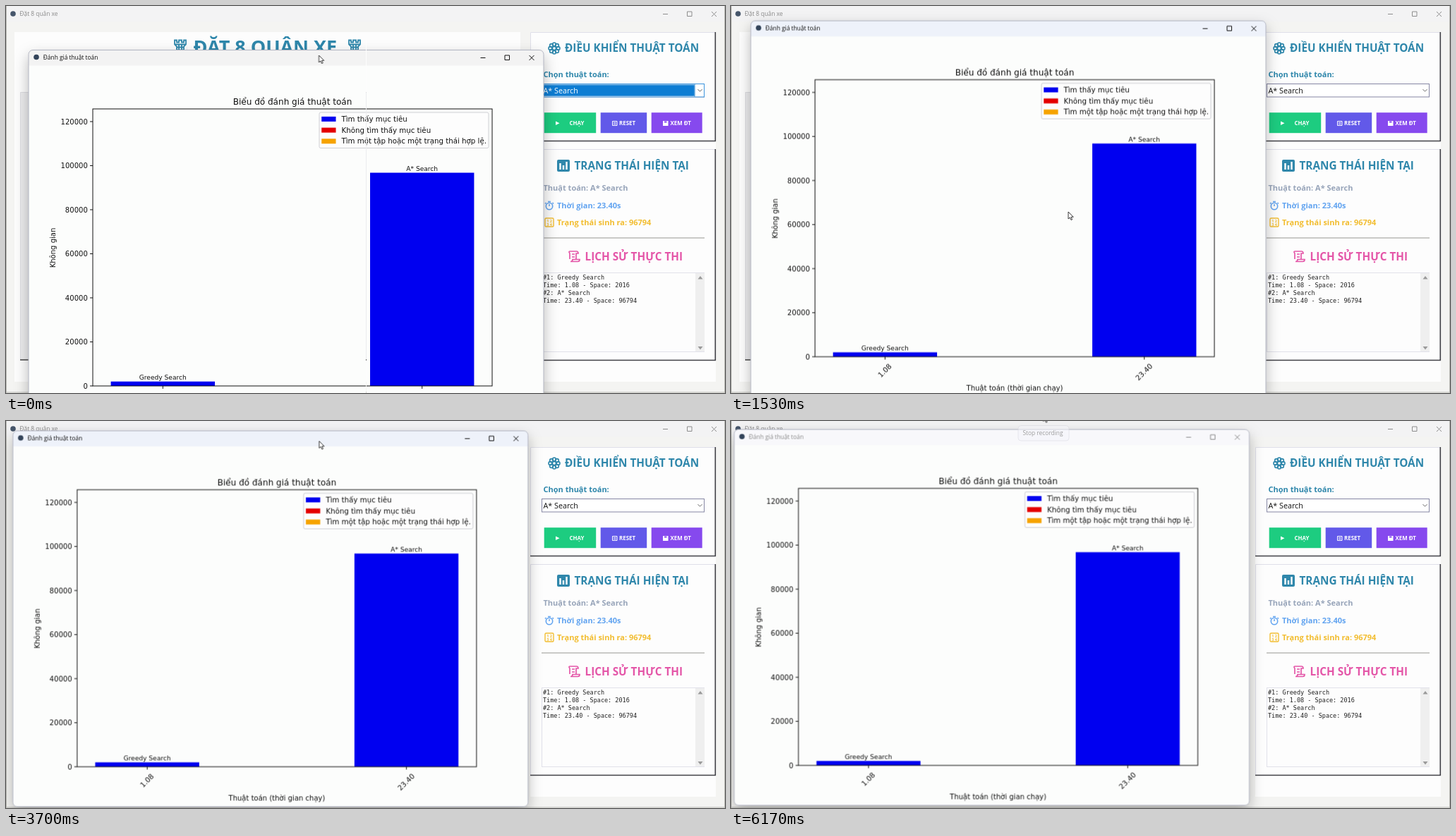
Animation of 1019x549 px, one loop 6210 ms. Source, as an HTML page:

```html
<!DOCTYPE html>
<html lang="vi">
<head>
<meta charset="utf-8">
<title>Đặt 8 quân xe</title>
<style>
  html, body { margin: 0; width: 100%; height: 100%; overflow: hidden; background: #f4f4f2; }
  svg { display: block; width: 1019px; height: 549px; }
  text { font-family: "Open Sans", "Noto Sans", sans-serif; white-space: pre; }
  .bold { font-weight: 700; }
  .head { font-weight: 700; font-size: 15.3px; }
  .info { font-weight: 700; font-size: 11px; }
  .btn { font-weight: 700; font-size: 7.9px; fill: #fff; }
  .bar { font-size: 8.4px; }
  .mono { font-family: "DejaVu Sans Mono", monospace; font-size: 8.5px; fill: #222; }
  #chart text { font-family: "DejaVu Sans", sans-serif; font-size: 10.04px; fill: #111; }
  #chart .title { font-size: 12.06px; }
  #chart .small { font-size: 9.1px; }
  #chart .key { font-size: 10.22px; }
  .mid { text-anchor: middle; }
  .end { text-anchor: end; }
  .line { fill: none; stroke: currentColor; }
</style>
</head>
<body>
<svg viewBox="0 0 1019 549" xmlns="http://www.w3.org/2000/svg">
  <defs>
    <filter id="shadow" x="-10%" y="-10%" width="120%" height="120%">
      <feDropShadow dx="0" dy="8" stdDeviation="10" flood-color="#000" flood-opacity=".28"/>
    </filter>
    <g id="controls" class="line">
      <path d="M0 0h7M34.5 -3.5h6.5v6.5h-6.5zM69 -3.5l7 7m0 -7l-7 7"/>
    </g>
    <path id="rook" class="line" stroke-width="1.8"
      d="M1 0h3v3h3v-3h4v3h3v-3h3v6l-3 3v7l3 4h-16l3 -4v-7l-3 -3zM2 6h14M4 10h10M7 7v9M11 7v9M4 14h10"/>
  </defs>

  <!-- main window -->
  <rect width="1019" height="549" fill="#f4f4f2"/>
  <rect width="1019" height="22" fill="#f3f3f4"/>
  <circle cx="10" cy="11" r="3.8" fill="#46566b"/>
  <text class="bar" x="19.5" y="14" fill="#8b8b8b">Đặt 8 quân xe</text>
  <use href="#controls" x="931" y="11.5" color="#8d8d8d"/>
  <path d="M0 548h1019M1018.5 0v549M.5 0v549" stroke="#b9b9b4"/>

  <rect x="12" y="37" width="717" height="496" fill="#fdfdfd"/>
  <g color="#2f87ab" fill="#2f87ab">
    <use href="#rook" x="238" y="48.5"/>
    <text class="bold" x="265.5" y="67.5" font-size="27">ĐẶT 8 QUÂN XE</text>
    <use href="#rook" x="485" y="48.5"/>
  </g>
  <rect x="20" y="122" width="700" height="380" fill="#ececee"/>
  <path d="M20.5 502V122.5H720" fill="none" stroke="#dcdce0"/>
  <path d="M20 502h700" stroke="#444" stroke-width="1.6"/>

  <rect x="743" y="37" width="263" height="496" fill="#fdfdfd"/>
  <g id="panels"></g>

  <g color="#2f87ab" fill="#2f87ab">
    <g id="flower" class="line" stroke-width="1.6"></g>
    <text class="head" x="792" y="65.3">ĐIỀU KHIỂN THUẬT TOÁN</text>
    <text class="info" x="761.5" y="101">Chọn thuật toán:</text>
    <rect x="781" y="218" width="18" height="17" rx="2"/>
    <path d="M785.5 232v-9M790 232v-6M794.5 232v-11" stroke="#fff" stroke-width="2.4"/>
    <text class="head" x="805.5" y="231.6">TRẠNG THÁI HIỆN TẠI</text>
  </g>

  <g id="combo">
    <rect x="759.5" y="110.5" width="230" height="18.5" fill="#fff" stroke="#8586a3"/>
    <path d="M980.5 118.2l3 3 3 -3" class="line" color="#666"/>
    <text x="761.5" y="124" font-size="10.75" fill="#111">A* Search</text>
  </g>
  <g id="picked">
    <rect x="759.5" y="110.5" width="230" height="18.5" fill="#fff" stroke="#3a93dc"/>
    <rect x="761" y="111.5" width="215" height="16.5" fill="#0d7dd3"/>
    <rect x="761.5" y="112" width="214" height="15.5" class="line" color="#b7cfe2" stroke-dasharray="1 1" stroke-width=".8"/>
    <path d="M976.5 111v18" stroke="#8cbfe6"/>
    <path d="M980.5 118.2l3 3 3 -3" class="line" color="#555"/>
    <text x="761.5" y="124" font-size="10.75" fill="#fff">A* Search</text>
  </g>

  <rect x="762.7" y="151.2" width="73.5" height="29" fill="#1dcc80"/>
  <path d="M779 163.5l5.5 2.7 -5.5 2.7z" fill="#fff"/>
  <text class="btn" x="798.5" y="169">CHẠY</text>
  <rect x="842.7" y="151.2" width="65.5" height="29" fill="#6259e9"/>
  <path d="M859.5 163.5h6.5v6h-6.5zM861 165.5h3.5M861 167.5h3.5" class="line" color="#fff"/>
  <text class="btn" x="869" y="169">RESET</text>
  <rect x="914.7" y="151.2" width="72" height="29" fill="#8649ee"/>
  <path d="M931 163h7.5v7h-7.5z" fill="#fff"/>
  <path d="M933 163.5h3.5v2h-3.5z" fill="#8649ee"/>
  <text class="btn" x="941.5" y="169">XEM ĐT</text>

  <text class="info" x="761.5" y="262.3" fill="#98a5ba">Thuật toán: A* Search</text>
  <g color="#62a4f0" fill="#62a4f0">
    <circle cx="770" cy="284" r="4.7" class="line" stroke-width="1.6"/>
    <path d="M770 284v-3M768 277.5h4M774.5 279l1.5 1.5M765.5 279l-1.5 1.5" class="line" stroke-width="1.5"/>
    <text class="info" x="781" y="286.6">Thời gian: 23.40s</text>
  </g>
  <g color="#f2bd30" fill="#f2bd30">
    <rect x="764" y="301" width="12" height="12" rx="1.5" class="line" stroke-width="1.4"/>
    <text class="bold" x="766.3" y="306.6" font-size="5.5">1 2</text>
    <text class="bold" x="766.3" y="311.8" font-size="5.5">3 4</text>
    <text class="info" x="781" y="310.8">Trạng thái sinh ra: 96794</text>
  </g>
  <path d="M759 329h231" stroke="#969690"/>
  <g color="#e456a8" fill="#e456a8">
    <path d="M799 359v-8q-2 -3 0 -3h9.5q2.500 0 2.500 3h-3v9M800 362.5h10.5q2.500 0 2.500 -3h-10q0 3 -2.500 3zM802 352h4M802 356h4" class="line" stroke-width="1.7"/>
    <text class="head" x="820.5" y="361">LỊCH SỬ THỰC THI</text>
  </g>

  <rect x="759.5" y="378.5" width="230" height="112" fill="#fdfdfd" stroke="#e1e1ea"/>
  <rect x="977" y="379" width="13" height="111" fill="#efefef"/>
  <path d="M980.5 387.5l3.5 -4.500 3.5 4.500zM980.5 483l3.5 4.500 3.5 -4.500z" fill="#9a9a9a"/>
  <g id="log"></g>

  <!-- chart window -->
  <g id="win">
    <rect x="4.5" y="12" width="730" height="533" rx="6" fill="#fcfdfc" filter="url(#shadow)"/>
    <path id="titlebar" d="M4.5 34V18q0 -6 6 -6h718q6 0 6 6v16z" fill="#eef2fa"/>
    <rect x="4.5" y="12" width="730" height="533" rx="6" fill="none" stroke="#b3b6c2"/>
    <circle cx="15.5" cy="22" r="3.8" fill="#33445a"/>
    <g id="caption" fill="#111" color="#111">
      <text class="bar" x="25.3" y="25.7">Đánh giá thuật toán</text>
      <use href="#controls" x="645" y="23"/>
    </g>
    <g id="chart"></g>
  </g>

  <g id="tip">
    <rect x="407" y="6.5" width="72" height="21.5" rx="4" fill="#f6f6fb" stroke="#d5d5de"/>
    <text class="bar mid" x="442" y="20" fill="#444">Stop recording</text>
  </g>
  <path id="cursor" d="M0 0v10l2.300 -2 1.700 3.600 1.600 -.7 -1.600 -3.600h3.200z" fill="#fff" stroke="#222" stroke-width=".9"/>
</svg>

<script>
const LOOP = 6210;
const $ = id => document.getElementById(id);
const text = (x, y, s, cls = "", extra = "") => `<text x="${x}" y="${y}" class="${cls}" ${extra}>${s}</text>`;
const rect = (x, y, w, h, fill) => `<rect x="${x}" y="${y}" width="${w}" height="${h}" fill="${fill}"/>`;

// raised panels: top, height
$("panels").innerHTML = [[37, 155], [203, 300]].map(([y, h]) =>
  `<path d="M743.5 ${y + h}V${y + .5}H1005" fill="none" stroke="#dfdfe9"/>
   <path d="M743 ${y + h - .5}H1005.3V${y}" fill="none" stroke="#404046" stroke-width="1.6"/>`).join("");

$("flower").innerHTML = `<circle cx="777" cy="60" r="2.6"/>` + Array.from({ length: 8 }, (_, i) => {
  const a = i * Math.PI / 4;
  return `<circle cx="${777 + 5.6 * Math.cos(a)}" cy="${60 + 5.6 * Math.sin(a)}" r="2.4"/>`;
}).join("");

$("log").innerHTML = ["#1: Greedy Search", "Time: 1.08 - Space: 2016", "#2: A* Search", "Time: 23.40 - Space: 96794"]
  .map((s, i) => text(761, 388 + i * 11, s, "mono")).join("");

function drawChart() {
  const base = 488.5, scale = 62.5 / 20000, blue = "#0000f0";
  let out = text(378.5, 89.2, "Biểu đồ đánh giá thuật toán", "title mid");
  const bars = [["Greedy Search", "1.08", 2016, 194.8, 508], ["A* Search", "23.40", 96794, 562.2, 510]];
  for (const [name, time, space, x, ty] of bars) {
    const h = space * scale;
    out += rect(x - 73.7, base - h, 147.4, h, blue)
      + text(x, base - h - 2.2, name, "small mid")
      + `<path d="M${x} ${base}v4" stroke="#111"/>`
      + text(0, 3.6, time, "mid", `transform="translate(${x - .5} ${ty}) rotate(-45)"`);
  }
  for (let v = 0; v <= 120000; v += 20000) {
    const y = base - v * scale;
    out += `<path d="M95.5 ${y}h-4" stroke="#111"/>` + text(88.3, y + 3.8, v, "end");
  }
  out += `<rect x="95.5" y="95.5" width="566" height="393" fill="none" stroke="#111"/>`
    + text(378.5, 536.2, "Thuật toán (thời gian chạy)", "mid")
    + text(0, 0, "Không gian", "mid", `transform="translate(43 292.5) rotate(-90)"`)
    + `<rect x="416.5" y="100.5" width="240" height="50.5" rx="2" fill="#fdfdfd" stroke="#cfcfd4"/>`;
  const legend = [[blue, "Tìm thấy mục tiêu"], ["#e40000", "Không tìm thấy mục tiêu"],
    ["#f6a300", "Tìm một tập hoặc một trạng thái hợp lệ."]];
  legend.forEach(([fill, s], i) => {
    const y = 106.4 + i * 15.7;
    out += rect(419.7, y, 20.3, 7, fill) + text(448, y + 7.2, s, "key");
  });
  $("chart").innerHTML = out;
}
drawChart();

// steps: [ms, x, y, easing to the next step]
const dragA = [[0, 27.5, 50.5, "ease-in-out"], [570, 24.5, 13.5, "ease-out"], [740, 23.5, 9]];
const dragB = [[3210, 23.5, 9, "ease-in"], [3470, 17.5, 6.5, "ease-out"], [3920, 0, 0]];
const held = (steps, gx, gy) => steps.map(([t, x, y, e]) => [t, x + gx, y + gy, e]);
const winPath = [...dragA, ...dragB, [LOOP, 0, 0]];
const cursorPath = [
  ...held(dragA, 416, 19.5), [900, 439.5, 28.5, "ease-in-out"], [1450, 478, 292],
  [2600, 478, 292, "ease-in-out"], ...held(dragB, 438.5, 26.5),
  [4200, 438.5, 26.5, "ease-in-out"], [4560, 442.5, -9.5], [LOOP, 442.5, -9.5]
];

const loop = (el, frames) => el.animate(frames, { duration: LOOP, iterations: Infinity });
const move = (el, path) => loop(el, path.map(([t, x, y, easing = "linear"]) =>
  ({ offset: t / LOOP, transform: `translate(${x}px, ${y}px)`, easing })));
// hard changes: [ms, value] holds until the next entry
const hold = (el, prop, steps) => loop(el, [...steps, [LOOP, steps.at(-1)[1]]].map(([t, value]) =>
  ({ offset: t / LOOP, [prop]: value, easing: "step-end" })));

const FOCUS = 100, BLUR = 6070;
move($("win"), winPath);
move($("cursor"), cursorPath);
hold($("picked"), "opacity", [[0, 1], [FOCUS, 0]]);
hold($("titlebar"), "fill", [[0, "#f3f3f3"], [FOCUS, "#eef2fa"], [BLUR, "#f8f8fb"]]);
for (const prop of ["fill", "color"]) hold($("caption"), prop, [[0, "#111"], [BLUR, "#8a8a8a"]]);
loop($("tip"), [
  { offset: 0, opacity: 0 }, { offset: BLUR / LOOP, opacity: 0 },
  { offset: 6170 / LOOP, opacity: .5 }, { offset: 1, opacity: .6 }]);
</script>
</body>
</html>
```
